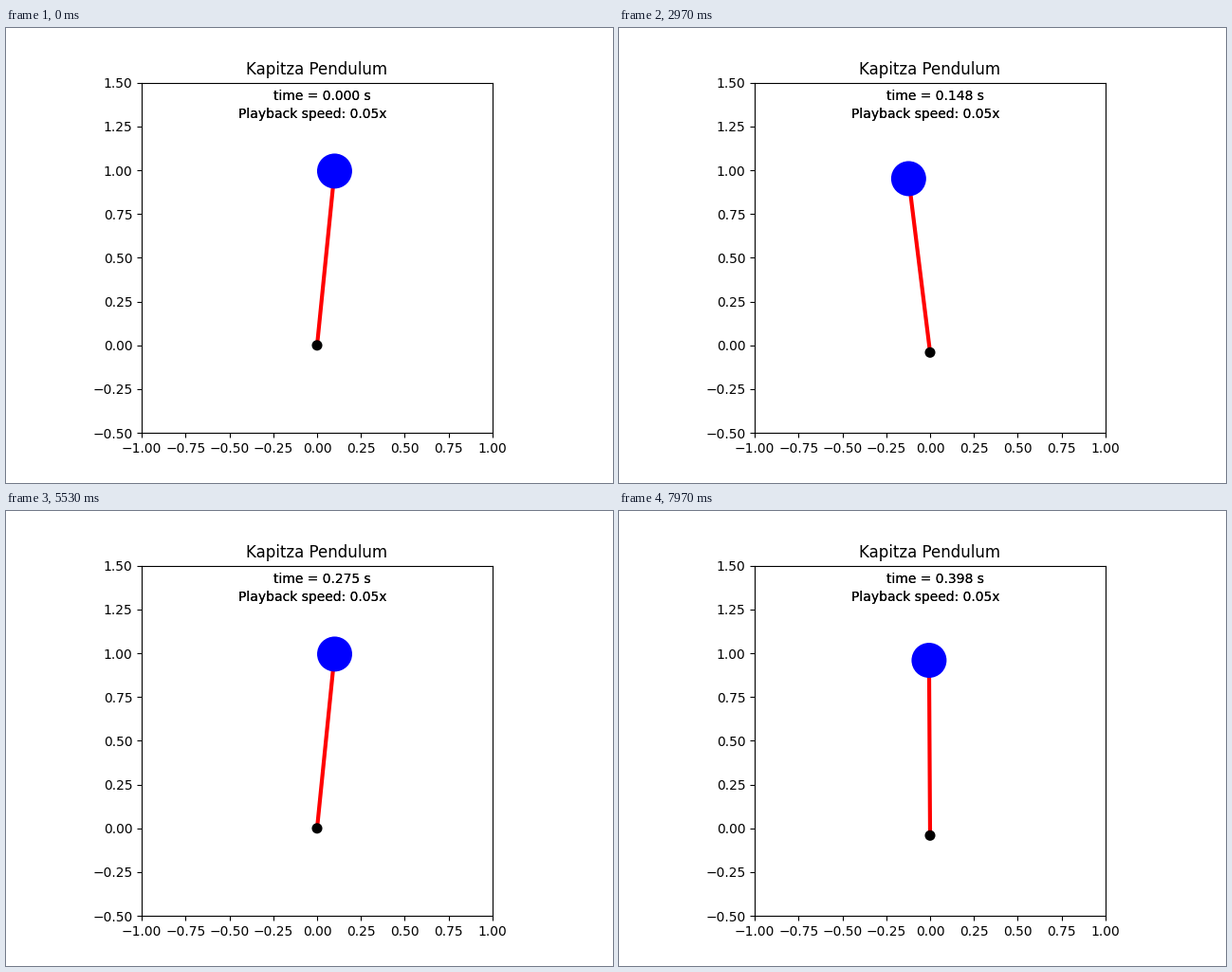
A matplotlib script for the animation above (8 s loop, 640x480 px).

```python
import math

import matplotlib.pyplot as plt
from matplotlib.animation import FuncAnimation
from matplotlib.patches import Circle

FPS = 30
FRAMES = 240
SPEED = 0.05          # playback speed
G = 9.81
LENGTH = 1.0
AMP = 0.1             # pivot amplitude
OMEGA = 2 * math.pi * 40
DAMPING = 2.85
SUBSTEPS = 20


def pivot(t):
    return AMP * math.sin(OMEGA * t)


def deriv(t, theta, rate):
    lift = G - AMP * OMEGA ** 2 * math.sin(OMEGA * t)
    return rate, lift / LENGTH * math.sin(theta) - DAMPING * rate


def rk4(t, theta, rate, h):
    a1, b1 = deriv(t, theta, rate)
    a2, b2 = deriv(t + h / 2, theta + h / 2 * a1, rate + h / 2 * b1)
    a3, b3 = deriv(t + h / 2, theta + h / 2 * a2, rate + h / 2 * b2)
    a4, b4 = deriv(t + h, theta + h * a3, rate + h * b3)
    return (theta + h / 6 * (a1 + 2 * a2 + 2 * a3 + a4),
            rate + h / 6 * (b1 + 2 * b2 + 2 * b3 + b4))


def solve():
    """Angle from the upright position at every frame."""
    dt = SPEED / FPS
    h = dt / SUBSTEPS
    theta, rate = 0.1, 0.0
    angles = []
    for i in range(FRAMES):
        angles.append(theta)
        for k in range(SUBSTEPS):
            theta, rate = rk4(i * dt + k * h, theta, rate, h)
    return angles


ANGLES = solve()

fig, ax = plt.subplots(figsize=(6.4, 4.8), dpi=100)
ax.set_aspect("equal")
ax.set_xlim(-1, 1)
ax.set_ylim(-0.5, 1.5)
ax.set_title("Kapitza Pendulum")

rod, = ax.plot([], [], color="red", lw=3, zorder=1)
bob = ax.add_patch(Circle((0, 0), 0.1, fc="blue", zorder=2))
hinge = ax.add_patch(Circle((0, 0), 0.03, fc="black", zorder=2))

# Each label is laid down twice, which makes it slightly heavier.
clocks = [ax.text(-0.25, 1.4, "") for _ in range(2)]
for _ in range(2):
    ax.text(-0.45, 1.3, f"Playback speed: {SPEED:.2f}x")


def update(i):
    t = i * SPEED / FPS
    y0 = pivot(t)
    x = LENGTH * math.sin(ANGLES[i])
    y = y0 + LENGTH * math.cos(ANGLES[i])
    rod.set_data([0, x], [y0, y])
    bob.center = (x, y)
    hinge.center = (0, y0)
    for clock in clocks:
        clock.set_text(f"time = {t:.3f} s")
    return [rod, bob, hinge, *clocks]


anim = FuncAnimation(fig, update, frames=FRAMES, interval=1000 / FPS,
                     init_func=lambda: update(0), repeat=True, repeat_delay=0)
plt.show()
```
